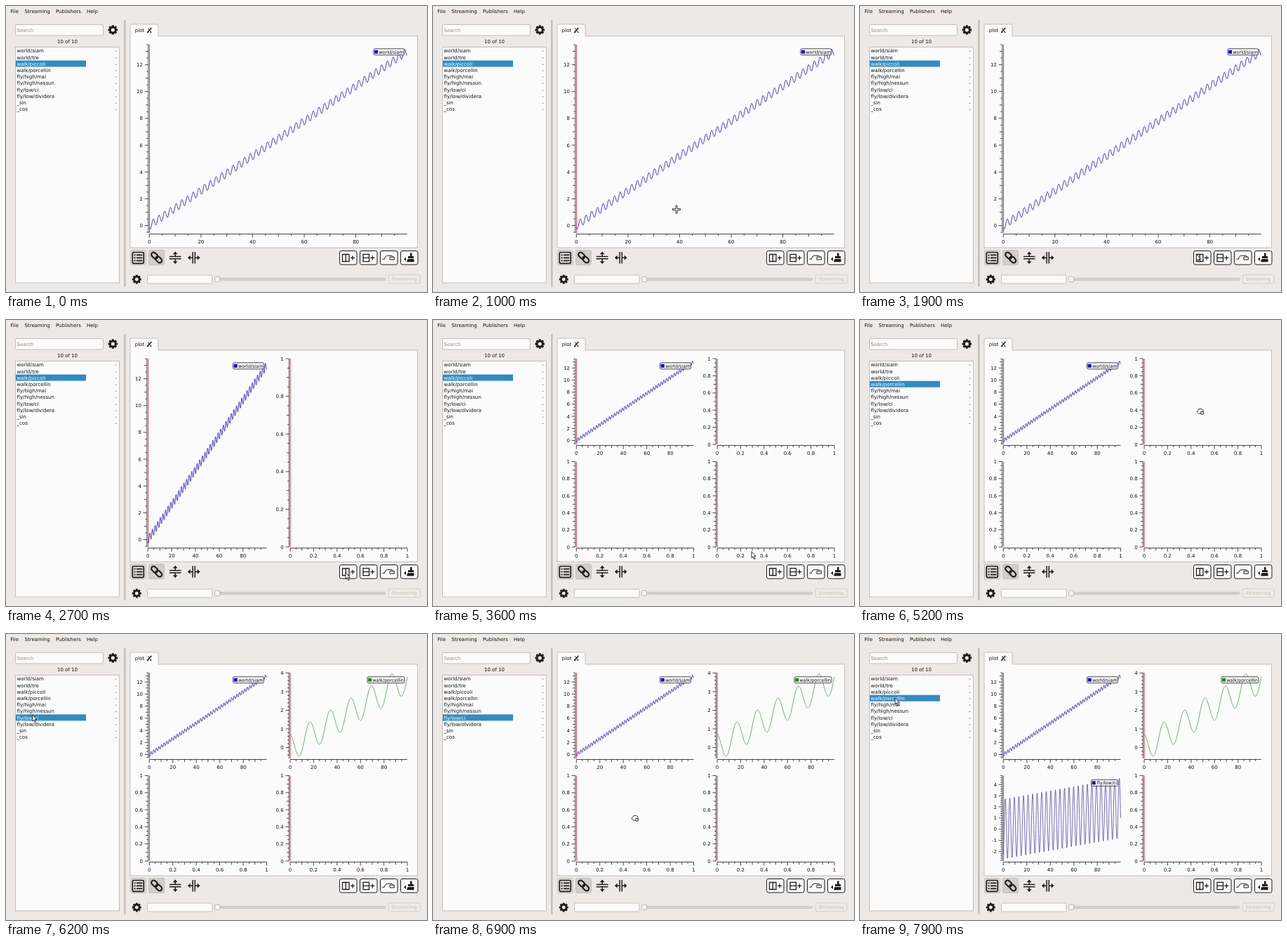
Animation, 600 px wide and 407 px high, one loop 8 s. Source, as an HTML page:

```html
<!DOCTYPE html>
<html lang="en">
<head>
<meta charset="utf-8">
<title>Plot layout</title>
<style>
html, body { margin: 0; width: 100%; height: 100%; overflow: hidden; background: #ede9e6; }
svg { display: block; width: 100vw; height: 100vh; }
text { font: 7px "DejaVu Sans", sans-serif; fill: #111; text-rendering: geometricPrecision; white-space: pre; }
</style>
</head>
<body>
<svg id="stage" viewBox="0 0 600 407" preserveAspectRatio="none"></svg>
<script>
const LOOP = 8000, STEP = 100;
const INK = '#1c1c1c', PAPER = '#fcfbfc', EDGE = '#c3beba', BACK = '#ede9e6';
const stage = document.getElementById('stage');

function add(tag, attrs, parent = stage) {
  const node = document.createElementNS('http://www.w3.org/2000/svg', tag);
  for (const key in attrs) node.setAttribute(key, attrs[key]);
  parent.appendChild(node);
  return node;
}
function group(x = 0, y = 0, parent = stage) {
  return add('g', { transform: `translate(${x} ${y})` }, parent);
}
function rect(x, y, width, height, attrs, parent) {
  return add('rect', { x, y, width, height, ...attrs }, parent);
}
function line(d, attrs, parent) {
  return add('path', { d, fill: 'none', stroke: INK, 'stroke-width': 1, ...attrs }, parent);
}
// y is the middle of the digits
function label(str, x, y, attrs, parent) {
  const node = add('text', { x, y: y + 2.55, ...attrs }, parent);
  node.textContent = str;
  return node;
}
function show(node, on) {
  node.style.display = on ? '' : 'none';
}

function gear(x, y, r) {
  const g = group(x, y);
  for (let i = 0; i < 4; i++)
    rect(-r * 0.23, -r, r * 0.46, r * 2, { fill: INK, rx: 0.5, transform: `rotate(${i * 45})` }, g);
  add('circle', { r: r * 0.58, fill: BACK, stroke: INK, 'stroke-width': r * 0.4 }, g);
}

// Menu and side panel
rect(0, 0, 600, 407, { fill: BACK });
[['File', 6.3], ['Streaming', 26.6], ['Publishers', 71], ['Help', 115]]
  .forEach(([str, x]) => label(str, x, 7.1));

rect(13.5, 26.5, 125, 15.5, { fill: PAPER, stroke: EDGE, rx: 1.5 });
label('Search', 15.5, 34.3, { style: 'fill:#8f8c8a' });
gear(152.3, 34, 6.8);
label('10 of 10', 87.5, 50.7, { 'text-anchor': 'middle' });
rect(13.5, 58.5, 148, 335.5, { fill: PAPER, stroke: EDGE });
rect(168.4, 20, 2, 379, { fill: '#b9b5b2' });

const marker = rect(14, 0, 100, 9, { fill: '#308cc6' });
const rowY = i => 63.8 + i * 9.22;
const rows = ['world/siam', 'world/tre', 'walk/piccoli', 'walk/porcellin', 'fly/high/mai',
  'fly/high/nessun', 'fly/low/ci', 'fly/low/dividera', '_sin', '_cos'].map((str, i) => {
  label('-', 155.2, rowY(i));
  return label(str, 15.5, rowY(i));
});

// Tab and plot pane
rect(177, 43, 409.5, 301, { fill: PAPER, stroke: EDGE });
line('M177 43.5V28Q177 26 179 26H215Q217 26 217 28V43.5', { fill: PAPER, stroke: EDGE });
rect(177.6, 42, 38.9, 2.5, { fill: PAPER });
label('plot', 183.8, 34.5);
line('M201.3 37.7L207.4 31', { 'stroke-width': 1.5 });
line('M202.5 31.4L206.6 37.4M201 37.6H203.4M205.6 37.4H207.6', {});

// Toolbar
[[177.5, '#dedad7'], [203.5, '#d2cecb']].forEach(([x, fill]) =>
  rect(x, 347.5, 22, 21, { fill, stroke: '#c4c0bc', rx: 2 }));
rect(180.3, 350.5, 16, 15.8, { fill: 'none', stroke: INK, 'stroke-width': 1.7, rx: 1.5 });
for (const y of [354.4, 358.4, 362.4])
  line(`M182.6 ${y}H184.6M186 ${y}H194.4`, { 'stroke-width': 1.9 });

const chain = add('g', { transform: 'translate(214.7 358) rotate(45)' });
for (const x of [-9.3, -0.9])
  rect(x, -3.2, 10.2, 6.4, { fill: 'none', stroke: INK, 'stroke-width': 2.1, rx: 3.2 }, chain);

function spread(x, turn) {
  const g = add('g', { transform: `translate(${x} 358.2) rotate(${turn})` });
  line('M-8.3 -1.6H8.3M-8.3 1.6H8.3', { 'stroke-width': 1.5 }, g);
  line('M0 -2V-6M0 2V6', { 'stroke-width': 1.5 }, g);
  add('path', { d: 'M-3.4 -5L0 -8.8 3.4 -5ZM-3.4 5L0 8.8 3.4 5Z', fill: INK }, g);
}
spread(241.2, 0);
spread(267.7, 90);

const buttons = [475, 504, 533, 562].map(x => {
  rect(x + 0.5, 348.5, 24.5, 19.5, { fill: PAPER, stroke: INK, rx: 2.5 });
  return group(x, 348);
});
line('M4.5 5.5H14V15.5H4.5ZM9.25 5.5V15.5M16 10.4H22M19 7.4V13.4', { 'stroke-width': 1.3 }, buttons[0]);
line('M5 5.3H13.5V15.6H5ZM5 10.4H13.5M15.3 10.4H21.3M18.3 7.4V13.4', { 'stroke-width': 1.3 }, buttons[1]);
line('M3.3 12.2H6.2Q7.5 7.2 10.5 7.2H15Q18 7.2 18.6 9M14 9.2H20.3V13H14Z', {}, buttons[2]);
add('path', { d: 'M14 3.5H16.6V8H19V11H11V8H14ZM10.5 12H19.5V16.3H9ZM5 12.2L8 9.6V15Z', fill: INK }, buttons[3]);

// Playback row
gear(186.3, 389, 6.5);
rect(201.5, 383, 92.5, 12, { fill: PAPER, stroke: EDGE, rx: 1.5 });
rect(300, 387.3, 241, 3.2, { fill: '#d3cfcb', stroke: '#c0bcb8', 'stroke-width': 0.6, rx: 1.5 });
rect(297.7, 385.2, 7, 7.2, { fill: '#f8f6f4', stroke: '#aaa6a2', 'stroke-width': 0.8, rx: 1.6 });
rect(545.5, 382.8, 44.5, 11.8, { fill: '#f0ece8', stroke: '#cbc7c3', 'stroke-width': 0.8, rx: 1.5 });
label('Streaming', 567.7, 388.9, { 'text-anchor': 'middle', style: 'fill:#c1bdb9' });

// Plots
const siam = { name: 'world/siam', color: '#1c16c0', dot: '#0c00f0', width: 44, weight: 0.85,
  f: x => 0.13 * x + 0.3 * Math.sin(2.84 * x - 2.7) };
const porcellin = { name: 'walk/porcellin', color: '#3d9c3d', dot: '#0f8f0f', width: 53, weight: 0.85,
  f: x => 0.0369 * x + 0.75 * Math.cos(0.36 * x + 0.3) };
const ci = { name: 'fly/low/ci', color: '#2b2199', dot: '#221488', width: 38, weight: 0.65,
  f: x => 0.019 * x + 2.68 * Math.sin(1.6175 * x - 1.018) };

// Visits ticks; size is 1 for labelled, less for the smaller ones
function eachTick([lo, hi, step], visit) {
  const parts = step === 1 ? 5 : 4, small = step / parts;
  for (let k = Math.ceil(lo / small - 1e-6); k * small <= hi + 1e-6; k++) {
    const size = k % parts === 0 ? 1 : parts === 4 && k % 2 === 0 ? 0.75 : 0.5;
    visit(k * small, size);
  }
}

function plot(from, to, [left, top, right, bottom], xs, ys, data) {
  const g = group();
  const px = v => left + (v - xs[0]) / (xs[1] - xs[0]) * (right - left);
  const py = v => bottom - (v - ys[0]) / (ys[1] - ys[0]) * (bottom - top);
  const ax = left - 1.5, ay = bottom + 1.5;
  let d = `M${ax} ${top}V${bottom}M${left} ${ay}H${right}`;
  const word = v => String(+v.toFixed(2));
  eachTick(xs, (v, size) => {
    d += `M${px(v)} ${ay}v${size * 5}`;
    if (size === 1) label(word(v), px(v), bottom + 12, { 'text-anchor': 'middle' }, g);
  });
  eachTick(ys, (v, size) => {
    d += `M${ax} ${py(v)}h${-size * 5}`;
    if (size === 1) label(word(v), left - 9.3, py(v), { 'text-anchor': 'end' }, g);
  });
  line(d, { 'stroke-width': 0.8 }, g);
  line(`M${left + 0.3} ${top}V${bottom}`, { stroke: '#c44a55' }, g);
  if (data) {
    const points = Array.from({ length: 1000 }, (_, i) =>
      `${px(i / 10).toFixed(2)},${py(data.f(i / 10)).toFixed(2)}`);
    add('polyline', { points: points.join(' '), fill: 'none', stroke: data.color, 'stroke-width': data.weight }, g);
    const end = right - 4, y = top + 5.8;
    rect(end - data.width, y, data.width, 9, { fill: PAPER, 'fill-opacity': 0.85, stroke: INK, 'stroke-width': 0.8, rx: 2 }, g);
    rect(end - data.width + 1.2, y + 2, 5, 5, { fill: data.dot }, g);
    label(data.name, end - 1, y + 4.3, { 'text-anchor': 'end', style: 'font-size:6.5px' }, g);
  }
  return { g, from, to, left, top, right, bottom };
}

const SPLIT = 2200, GRID = 3100, DROP1 = 5400, DROP2 = 7000;
const unit = [0, 1, 0.2], span = [0, 99.9, 20];
const topLeft = [204.3, 55, 371.5, 177], topRight = [405, 55, 572, 177];
const lowLeft = [204.3, 201.5, 371.5, 323], lowRight = [405, 201.5, 572, 323];
const plots = [
  plot(0, SPLIT, [204.3, 55, 571.8, 323], span, [-0.55, 13.5, 2], siam),
  plot(SPLIT, GRID, [202.3, 55, 371.5, 323], span, [-0.55, 13.5, 2], siam),
  plot(SPLIT, GRID, [405, 55, 572, 323], unit, unit),
  plot(GRID, LOOP, topLeft, span, [-0.64, 13.54, 2], siam),
  plot(GRID, DROP1, topRight, unit, unit),
  plot(DROP1, LOOP, topRight, span, [-0.585, 4.02, 1], porcellin),
  plot(GRID, DROP2, lowLeft, unit, unit),
  plot(DROP2, LOOP, lowLeft, span, [-2.85, 4.8, 1], ci),
  plot(GRID, LOOP, lowRight, unit, unit)
];

// Pointers
const pointers = { arrow: group(), cross: group(), hand: group() };
const outline = { fill: '#fff', 'stroke-width': 0.9, 'stroke-linejoin': 'round' };
line('M0 0V9L2 7.2 3.6 10.9 5.1 10.2 3.5 6.7H6.3Z', outline, pointers.arrow);
line('M-1 -5.5H1V-1H5.5V1H1V5.5H-1V1H-5.5V-1H-1Z', outline, pointers.cross);
line('M-4.5 1.2Q-5.2 -1 -3.3 -1.3Q-3 -4 -.8 -3.4Q1.2 -4.6 2.3 -3Q4.4 -2.6 4.2 0V3.2H-2.5Z', outline, pointers.hand);
line('M.8 .6H4.3V4H.8Z', outline, pointers.hand);

const path = [
  [700, 296, 402], [1000, 347, 289.5], [1500, 440, 300], [2000, 484, 359.5], [2700, 484, 359.5],
  [3000, 513, 359], [3200, 513, 359], [3600, 454, 329.5], [4400, 46, 90], [4500, 46, 90],
  [5200, 485, 130], [5400, 485, 130], [6000, 37.7, 115], [6200, 37.7, 115],
  [6900, 288, 262], [7000, 288, 262], [7500, 50, 91], [8000, 50, 91]
];
function pointerAt(t) {
  const i = path.findIndex(p => p[0] > t);
  const [t0, x0, y0] = path[i - 1], [t1, x1, y1] = path[i];
  const u = (t - t0) / (t1 - t0), k = u * u * (3 - 2 * u);
  return [x0 + (x1 - x0) * k, y0 + (y1 - y0) * k];
}

const picks = [[0, 2], [4500, 3], [6200, 6], [7700, 3]];

function draw(time) {
  const t = Math.floor(time % LOOP / STEP) * STEP;
  const row = picks.filter(p => p[0] <= t).pop()[1];
  marker.setAttribute('y', rowY(row) - 4.7);
  rows.forEach((node, i) => { node.style.fill = i === row ? '#fff' : ''; });

  const active = p => t >= p.from && t < p.to;
  plots.forEach(p => show(p.g, active(p)));

  let kind = '';
  if (t >= path[0][0]) {
    const [x, y] = pointerAt(t);
    const inside = plots.some(p => active(p) && x > p.left && x < p.right && y > p.top && y < p.bottom);
    const drag = t > 4500 && t < DROP1 || t > 6200 && t < DROP2;
    kind = drag ? 'hand' : inside ? 'cross' : 'arrow';
    pointers[kind].setAttribute('transform', `translate(${x.toFixed(2)} ${y.toFixed(2)})`);
  }
  for (const name in pointers) show(pointers[name], name === kind);
}

const start = performance.now();
function tick() {
  draw(performance.now() - start);
  requestAnimationFrame(tick);
}
tick();
</script>
</body>
</html>
```
